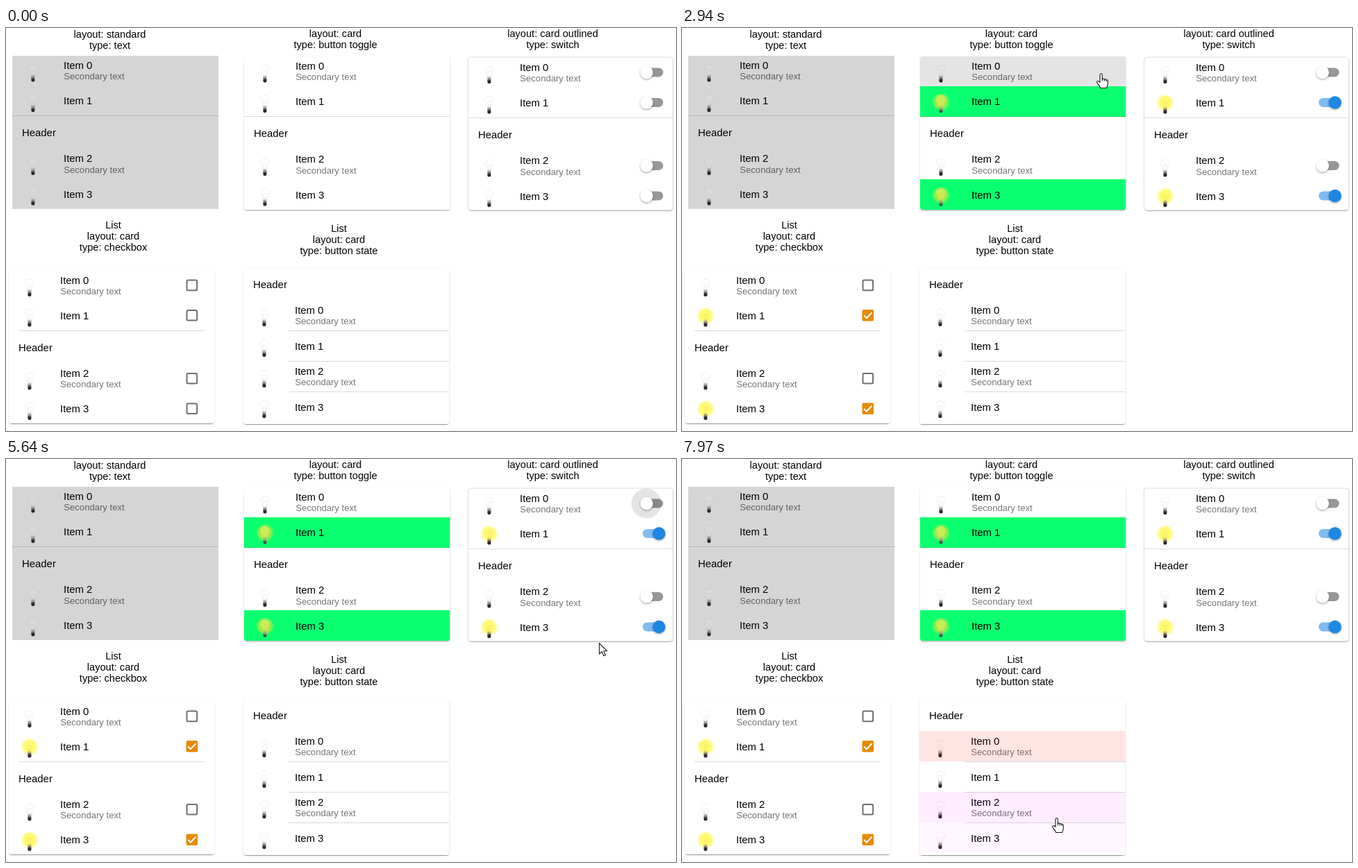
An HTML page with a canvas that plays this animation: 965x581 px, repeating every 8 s.

```html
<!DOCTYPE html>
<html lang="en">
<head>
<meta charset="utf-8">
<title>List layouts</title>
<style>
html, body { margin: 0; width: 100%; height: 100%; overflow: hidden; background: #fff; }
canvas { display: block; }
</style>
</head>
<body>
<canvas id="stage" width="965" height="581"></canvas>
<script>
const ctx = document.getElementById('stage').getContext('2d');
const LOOP = 8000, STEP = 70, FONT = '"Liberation Sans", Arial, sans-serif';
const ROW_H = 44;
const clamp = v => Math.max(0, Math.min(1, v));

// Row tops are relative to the card; every second row has a secondary line.
const ROWS = [0, 43.4, 134.4, 177.9];
const STATE_ROWS = [46, 90.1, 134.2, 178.3];
const cards = [
  { kind: 'text', x: 9, y: 40, w: 297, h: 221, titleX: 149.5, titleY: 14, lines: ['layout: standard', 'type: text'] },
  { kind: 'toggle', x: 343, y: 41, w: 296.5, h: 221.3, titleX: 474.5, titleY: 13, lines: ['layout: card', 'type: button toggle'] },
  { kind: 'switch', x: 666, y: 42.5, w: 295, h: 220, titleX: 787.5, titleY: 13, lines: ['layout: card outlined', 'type: switch'] },
  { kind: 'checkbox', x: 4, y: 349.5, w: 296, h: 220.5, titleX: 154.5, titleY: 289, lines: ['List', 'layout: card', 'type: checkbox'] },
  { kind: 'state', x: 342, y: 346.5, w: 296.5, h: 224.5, titleX: 479.5, titleY: 294, lines: ['List', 'layout: card', 'type: button state'] }
];
for (const c of cards) c.rows = c.kind === 'state' ? STATE_ROWS : ROWS;

// When each item is on: [start, end].
const onTimes = [[3030, 4810], [1630, Infinity], [Infinity, Infinity], [1280, Infinity]];
const level = (i, t) => clamp((t - onTimes[i][0]) / 100) - clamp((t - onTimes[i][1]) / 100);

// Pointer tip: time, x, y.
const path = [
  [440, 783, 548], [860, 512, 112], [980, 503, 150], [1130, 500, 230], [1400, 500, 230],
  [1560, 498, 104], [2230, 497, 104], [2440, 498, 132], [2700, 500, 66], [2940, 603, 66],
  [3100, 603, 66], [3450, 740, 72], [3720, 865, 126], [3870, 865, 126], [4050, 926, 116],
  [4510, 926, 116], [4650, 929, 79], [5240, 929, 79], [5500, 868, 240], [5550, 857, 265],
  [5640, 854, 265], [5720, 854, 265], [5950, 690, 340], [6260, 541, 431], [6799, 541, 431],
  [6800, 541, 436], [6880, 541, 436], [7100, 541, 468], [7590, 540, 520], [7670, 540, 520],
  [7760, 540, 546], [7850, 540, 546], [7915, 539, 518], [8000, 539, 518]
];

function pointer(t) {
  if (t < path[0][0]) return null;
  let i = 0;
  while (i < path.length - 2 && path[i + 1][0] <= t) i++;
  const [t0, x0, y0] = path[i], [t1, x1, y1] = path[i + 1];
  const p = clamp(Math.floor((t - t0) / STEP) * STEP / (t1 - t0));
  return { x: x0 + (x1 - x0) * p, y: y0 + (y1 - y0) * p };
}

function inRow(c, i, p) {
  const top = c.y + c.rows[i];
  return !!p && c.kind !== 'text' && p.x > c.x && p.x < c.x + c.w && p.y >= top && p.y < top + ROW_H;
}

// Hover fades over a short window of past pointer positions.
function hover(c, i, t) {
  let n = 0;
  for (let k = 0; k < 6; k++) if (inRow(c, i, pointer(t - k * 15))) n++;
  return n / 6;
}

function text(s, x, y, size, color = '#000', align = 'left') {
  ctx.font = `${size}px ${FONT}`;
  ctx.fillStyle = color;
  ctx.textAlign = align;
  ctx.fillText(s, x, Math.round(y));
}

function rect(x, y, w, h, color) {
  ctx.fillStyle = color;
  ctx.fillRect(x, y, w, h);
}

function roundRect(x, y, w, h, r) {
  ctx.beginPath();
  ctx.roundRect(x, y, w, h, r);
}

function disc(x, y, r, color) {
  ctx.beginPath();
  ctx.arc(x, y, r, 0, 7);
  ctx.fillStyle = color;
  ctx.fill();
}

function shadow(alpha, blur, dy) {
  ctx.shadowColor = `rgba(0,0,0,${alpha})`;
  ctx.shadowBlur = blur;
  ctx.shadowOffsetY = dy;
}

function surface(c) {
  if (c.kind === 'text') return rect(c.x, c.y, c.w, c.h, '#d5d5d5');
  ctx.save();
  ctx.fillStyle = '#fff';
  for (const [alpha, blur, dy, inset] of [[.24, 1, 2, 1], [.15, 1, 1, 0], [.12, 3, 1, 0]]) {
    shadow(alpha, blur, dy);
    roundRect(c.x + inset, c.y + inset, c.w - 2 * inset, c.h - 2 * inset, 4);
    ctx.fill();
  }
  ctx.restore();
  if (c.kind === 'switch') {
    roundRect(c.x - .5, c.y - .5, c.w, c.h + .5, 4);
    ctx.strokeStyle = '#dedede';
    ctx.lineWidth = 1;
    ctx.stroke();
  }
}

function glass(x, y) {
  ctx.beginPath();
  ctx.moveTo(x - 2.6, y + 29);
  ctx.bezierCurveTo(x - 2.6, y + 24, x - 6.2, y + 22, x - 6.2, y + 18.5);
  ctx.bezierCurveTo(x - 6.2, y + 11, x + 6.2, y + 11, x + 6.2, y + 18.5);
  ctx.bezierCurveTo(x + 6.2, y + 22, x + 2.6, y + 24, x + 2.6, y + 29);
}

function bulb(x, y, on, onGreen) {
  if (on) {
    const g = ctx.createRadialGradient(x, y + 22, 0, x, y + 22, 13);
    const glow = a => onGreen ? `rgba(240,225,50,${a * .8})` : `rgba(253,250,80,${a})`;
    g.addColorStop(0, glow(.85));
    g.addColorStop(.6, glow(.8));
    g.addColorStop(.82, glow(.45));
    g.addColorStop(1, glow(0));
    disc(x, y + 22, 13, g);
  }
  glass(x, y);
  ctx.fillStyle = on ? 'rgba(255,245,110,.4)' : 'rgba(255,255,255,.12)';
  ctx.fill();
  ctx.lineWidth = .8;
  ctx.strokeStyle = on ? (onGreen ? 'rgba(255,205,110,.8)' : 'rgba(235,230,90,.35)') : 'rgba(150,150,150,.2)';
  ctx.stroke();
  ctx.beginPath();
  ctx.moveTo(x - 1, y + 28);
  ctx.lineTo(x - 2.3, y + 20);
  ctx.lineTo(x + 2.3, y + 20);
  ctx.lineTo(x + 1, y + 28);
  ctx.strokeStyle = on ? 'rgba(225,180,60,.3)' : 'rgba(150,140,140,.18)';
  ctx.stroke();
  const base = ctx.createLinearGradient(0, y + 27.5, 0, y + 37.5);
  base.addColorStop(0, on ? 'rgba(190,185,90,.3)' : 'rgba(150,143,143,.3)');
  base.addColorStop(.4, onGreen && on ? '#a9b08c' : '#857d7c');
  base.addColorStop(.65, onGreen && on ? '#6b7358' : '#2b2526');
  base.addColorStop(1, '#2b2728');
  roundRect(x - 2.6, y + 27.5, 5, 10, [0, 0, 2, 2]);
  ctx.fillStyle = base;
  ctx.fill();
}

function toggleSwitch(y, v, focus) {
  const x = 922.7 + 17.8 * v;
  roundRect(917, y - 6.5, 29.5, 13, 6.5);
  ctx.fillStyle = v > .5 ? '#80bbf0' : '#979797';
  ctx.fill();
  if (focus > 0) disc(x - .5, y, 21.5, `rgba(0,0,0,${.105 * focus})`);
  ctx.save();
  shadow(.35, 3, 1.3);
  disc(x, y, 9.2, v > .5 ? '#1e86e4' : '#fff');
  ctx.restore();
}

function checkbox(x, y, on) {
  ctx.lineWidth = 2;
  if (!on) {
    roundRect(x - 7.2, y - 7.2, 14.6, 14.6, 1.5);
    ctx.strokeStyle = '#6f6f6f';
    ctx.stroke();
    return;
  }
  roundRect(x - 8.2, y - 8.2, 16.6, 16.6, 2);
  ctx.fillStyle = '#e68a00';
  ctx.fill();
  ctx.beginPath();
  ctx.moveTo(x - 5.5, y + .3);
  ctx.lineTo(x - 1.8, y + 4);
  ctx.lineTo(x + 5.8, y - 4);
  ctx.strokeStyle = '#fff';
  ctx.stroke();
}

function drawRow(c, i, t) {
  const y = c.y + c.rows[i], v = level(i, t), h = hover(c, i, t);
  const isState = c.kind === 'state', isToggle = c.kind === 'toggle';
  const lit = v > .3 && !isState && c.kind !== 'text';
  const tint = color => rect(c.x, Math.floor(y), c.w, ROW_H, color);
  if (isToggle && v > 0) tint(`rgba(10,255,112,${v})`);
  bulb(c.x + 30, y, lit, isToggle);

  const dy = (c.kind === 'switch' ? .5 : 0) + (isState ? .3 : 0);
  const two = i % 2 === 0;
  text('Item ' + i, c.x + 74, y + dy + (two ? 19 : 26.8), 14.9);
  if (two) text('Secondary text', c.x + 74.3, y + dy + 34.2, 13.1, 'rgba(0,0,0,.54)');
  if (c.kind === 'checkbox') checkbox(267.7, y + 21.3, lit);
  if (c.kind === 'switch') {
    const focus = i === 0 ? clamp((t - 4810) / 150) - clamp((t - 6420) / 150) : 0;
    toggleSwitch(y + 21.5, v, focus);
  }

  if (isState) {
    const picked = i === 0 ? clamp((t - 6420) / 150) : 0;
    const press = i === 0 ? Math.sin(Math.PI * clamp((t - 6420) / 220)) : 0;
    tint(`rgba(255,0,0,${.105 * picked * (1 - h)})`);
    tint(`rgba(250,0,250,${.1 * h + .06 * press})`);
    if (i < 3) rect(407, Math.round(y + 43.4), 231, 1, '#d9d9d9');
  } else if (h > 0) {
    tint(`rgba(0,0,0,${.105 * h})`);
  }
}

function drawCard(c, t) {
  c.lines.forEach((s, i) => text(s, c.titleX, c.titleY + 16 * i, 14.6, '#000', 'center'));
  surface(c);
  const lift = c.kind === 'switch' ? .5 : 0;
  text('Header', c.x + 14, c.y + lift + (c.kind === 'state' ? 28 : 116), 14.9);
  ctx.save();
  roundRect(c.x, c.y, c.w, c.h, c.kind === 'text' ? 0 : 4);
  ctx.clip();
  for (let i = 0; i < 4; i++) drawRow(c, i, t);
  if (c.kind !== 'state') {
    const inset = c.kind === 'checkbox' ? 14 : 0;
    rect(c.x + inset, Math.floor(c.y + 86.6), c.w - 2 * inset, 1, 'rgba(0,0,0,.14)');
  }
  ctx.restore();
}

const arrow = new Path2D('M0 0V15.5L3.7 12.2L6.4 18.3L9 17.2L6.4 11.2H11Z');
const hand = new Path2D('M-1.5 .5Q0 -2 1.8 .5V7Q3.6 5.6 4.8 7.6Q6.4 6.4 7.6 8.4Q9.7 7.7 9.8 10V14Q9.4 16.5 8 20H-.8Q-2.2 16.5 -5 13.5Q-7 10.5 -4.6 10Q-3 10 -1.5 12Z');
const fingers = new Path2D('M1.8 7V10M4.8 7.8V10.2M7.6 8.6V10.6');

function drawPointer(t) {
  const p = pointer(t);
  if (!p) return;
  const isHand = cards.some(c => c.rows.some((_, i) => inRow(c, i, p)));
  const shape = isHand ? hand : arrow;
  ctx.save();
  ctx.translate(Math.round(p.x) + .5, Math.round(p.y) + .5);
  ctx.lineJoin = 'round';
  ctx.lineWidth = 1.1;
  ctx.fillStyle = '#fff';
  ctx.strokeStyle = '#16191c';
  ctx.fill(shape);
  ctx.stroke(shape);
  if (isHand) ctx.stroke(fingers);
  ctx.restore();
}

function draw(now) {
  const t = now % LOOP;
  rect(0, 0, 965, 581, '#fff');
  for (const c of cards) drawCard(c, t);
  drawPointer(t);
}

const start = performance.now();
function frame() {
  draw(performance.now() - start);
  requestAnimationFrame(frame);
}
frame();
</script>
</body>
</html>
```
